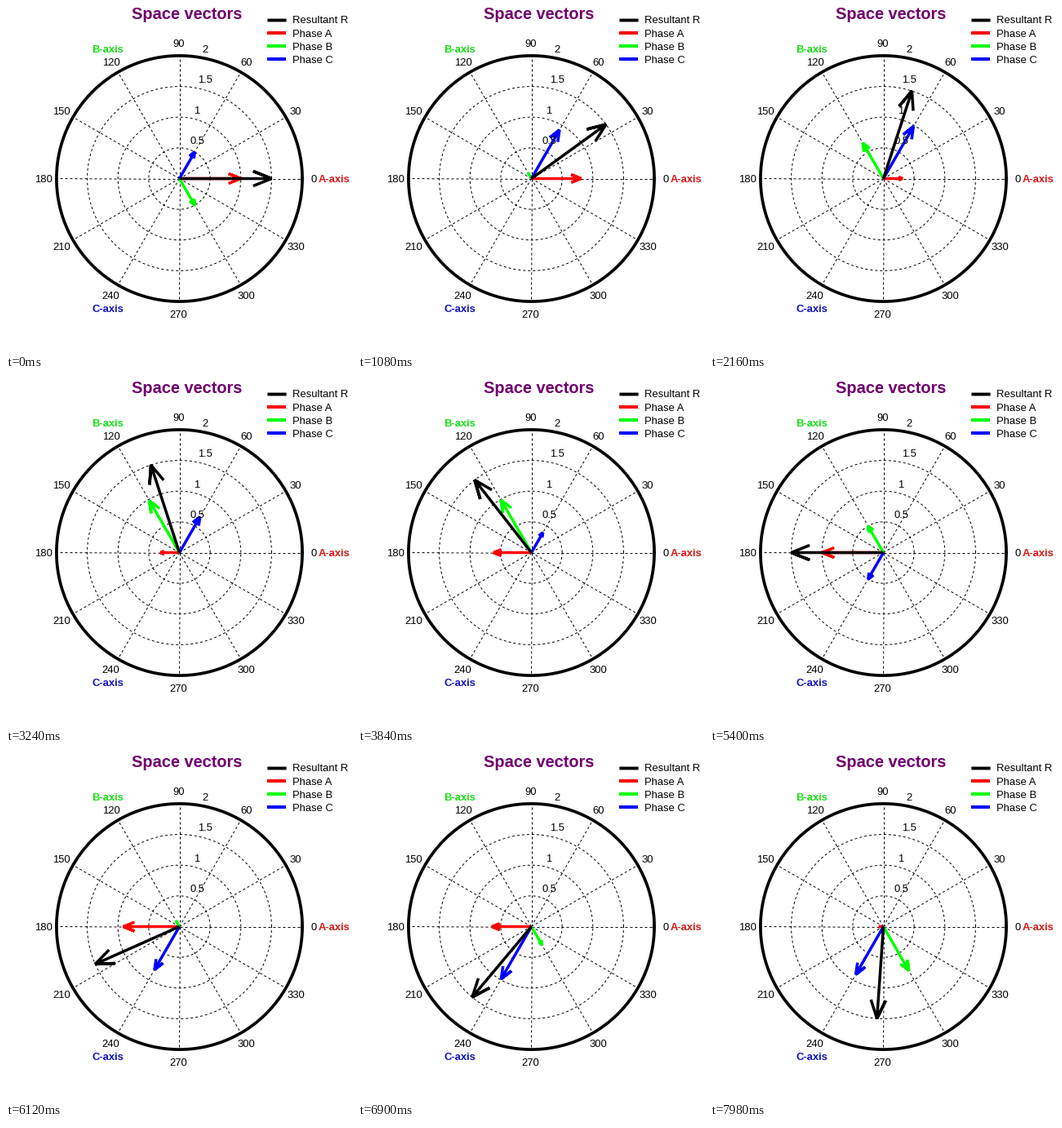
A matplotlib script that plays this animation: 424x424 px, repeating every 8000 ms.

```python
import numpy as np
import matplotlib.pyplot as plt
from matplotlib.animation import FuncAnimation

SIZE = 424
PX = 0.72                  # points per pixel at 100 dpi
CX, CY, UNIT = 212.5, 211.5, 75.3
STEP_MS, TICK_MS, LOOP_MS = 60, 20, 8000
RED, GREEN, BLUE = "#ff0000", "#00ff00", "#0000ff"

plt.rcParams["font.family"] = "Liberation Sans"

fig = plt.figure(figsize=(SIZE / 100, SIZE / 100), dpi=100, facecolor="white")
ax = fig.add_axes([0, 0, 1, 1])
ax.set_xlim(0, SIZE)
ax.set_ylim(SIZE, 0)
ax.axis("off")


def to_px(r, deg):
    a = np.radians(deg)
    return CX + UNIT * r * np.cos(a), CY - UNIT * r * np.sin(a)


def label(x, y, text, size=13, color="black", ha="left", weight="normal"):
    ax.text(x, y, text, fontsize=size * PX, color=color, ha=ha,
            va="baseline", weight=weight, zorder=10)


def stroke(x, y, width, color, **kw):
    return ax.plot(x, y, color=color, lw=width * PX, **kw)[0]


def draw_grid():
    dots = dict(ls=(0, (3, 3)), dash_capstyle="butt", zorder=1)
    ring = np.linspace(0, 360, 361)
    for r in (0.5, 1, 1.5):
        stroke(*to_px(r, ring), 1, "black", **dots)
    for deg in range(0, 360, 30):
        stroke(*np.transpose([to_px(0, deg), to_px(2, deg)]), 1, "black", **dots)
        x, y = to_px(2.2, deg)
        label(x - 1, y + 4.5, str(deg), ha="center")
    stroke(*to_px(2, ring), 3.7, "black", zorder=2)
    for r in (0.5, 1, 1.5, 2):
        x, y = to_px(r + 0.025, 82)
        label(x + 7, y - 3.3, f"{r:g}")


def draw_captions():
    label(221.5, 16, "Space vectors", 20, "#700070", "center", "bold")
    label(383, 215.5, "A-axis", color="#d81818", weight="bold")
    label(105.5, 57, "B-axis", color="#18e018", weight="bold")
    label(106, 375, "C-axis", color="#1010c0", weight="bold")
    rows = [("Resultant R", "black", 16.5), ("Phase A", RED, 33),
            ("Phase B", GREEN, 49), ("Phase C", BLUE, 65)]
    stroke([320, 343], [16.5, 16.5], 5, "#909090", solid_capstyle="butt")
    for text, color, y in rows:
        width = 3 if color == "black" else 4
        stroke([320, 343], [y, y], width, color, solid_capstyle="butt")
        label(351, y + 4.5, text)


def arrow(color, order):
    return stroke([], [], 3.5, color, zorder=order,
                  solid_joinstyle="bevel", solid_capstyle="butt")


def point(line, length, deg):
    """Shaft plus an open head, both scaled by the signed length."""
    shape = np.array([0, 1, 0.8 + 0.08j, 1, 0.8 - 0.08j])
    z = shape * length * np.exp(1j * np.radians(deg))
    line.set_data(CX + UNIT * z.real, CY - UNIT * z.imag)


draw_grid()
draw_captions()
phases = [(arrow(RED, 4), 0), (arrow(GREEN, 5), 120), (arrow(BLUE, 6), 240)]
resultant = arrow("black", 7)


def update(i):
    theta = 2 * (i * TICK_MS // STEP_MS)
    for line, axis in phases:
        point(line, np.cos(np.radians(theta - axis)), axis)
    point(resultant, 1.5, theta)
    return [line for line, _ in phases] + [resultant]


anim = FuncAnimation(fig, update, frames=LOOP_MS // TICK_MS, interval=TICK_MS,
                     init_func=lambda: update(0), repeat=True, repeat_delay=0)
plt.show()
```
